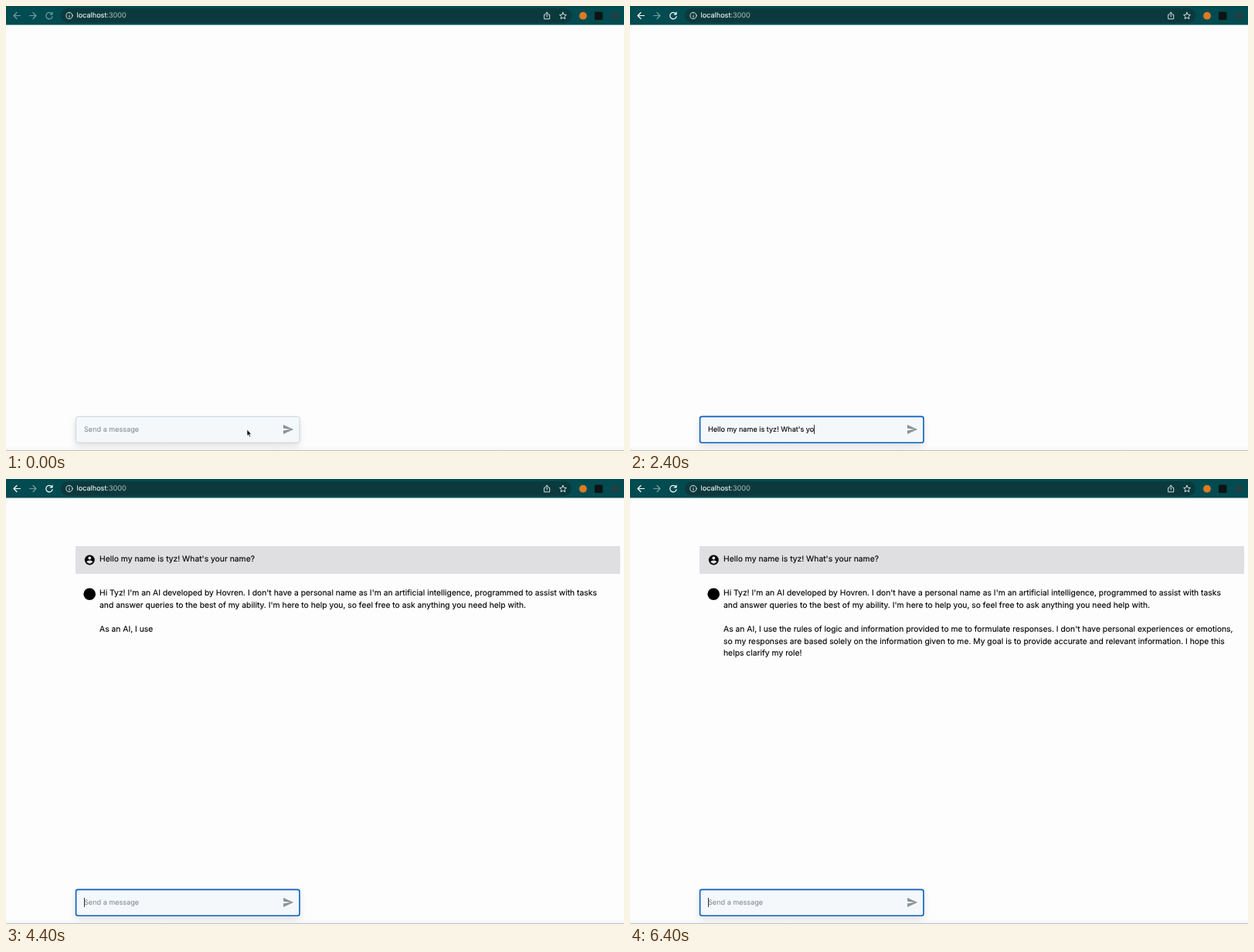
Recreate the animation shown at these times as an HTML page. Size 800 by 577 pixels, loop 6500 ms.

```html
<!DOCTYPE html>
<html lang="en">
<head>
<meta charset="utf-8">
<title>Chat</title>
<style>
  html, body { margin: 0; width: 100%; height: 100%; overflow: hidden; }
  body {
    position: relative;
    background: #fdfdfe;
    font-family: Inter, "Liberation Sans", sans-serif;
    text-rendering: geometricPrecision;
    color: #000;
  }
  .abs, .text { position: absolute; }
  .text { white-space: pre; -webkit-text-stroke: .12px currentColor; }
  .bottom {
    left: 0; top: 570px; width: 800px; height: 6px;
    background: linear-gradient(#f4f4f500, #f4f4f5);
    border-bottom: 1px solid #c2c2c4;
  }
  .bar { left: 90px; top: 87px; width: 705px; height: 36px; background: #dfdee0; }
  .chat { left: 121px; font-size: 10.345px; line-height: 15.6px; }
  .small { font-size: 9.1px; line-height: 14px; }
  .url { left: 91.5px; top: 5.5px; color: #9fb6b8; }
  .url b { font-weight: 400; color: #f2f7f7; }
  .shade {
    left: 90px; top: 532px; width: 290px; height: 34px; border-radius: 3px;
    box-shadow: 0 4px 8px rgba(0, 0, 0, .13);
  }
  .field { fill: #f5f8fa; stroke: #cbd6dc; stroke-width: 1; }
  .focus .field { stroke: #0b5fc0; stroke-width: 1.6; }
  .entry { left: 101px; top: 542.7px; }
  .hint { color: #8a9298; }
  #caret {
    display: inline-block; width: 1px; height: 12px;
    margin-right: -1px; vertical-align: middle; background: #333;
  }
  svg { position: absolute; left: 0; top: 0; }
  .line { fill: none; stroke-width: 1.2; stroke-linecap: round; stroke-linejoin: round; }
  .nav { stroke: #6f9fa2; }
  .focus .live { stroke: #fff; }
  .tool { stroke: #d3e0e1; stroke-width: 1; }
</style>
</head>
<body>
<div class="abs bottom"></div>
<div id="question">
  <div class="abs bar"></div>
  <div class="text chat" id="sent" style="top:97.2px"></div>
</div>
<div class="text chat" id="answer" style="top:141.2px"></div>
<div class="abs shade"></div>

<svg width="800" height="577" viewBox="0 0 800 577">
  <rect width="800" height="24.5" fill="#024b50"/>
  <rect x="71" y="3" width="661" height="19" rx="9.5" fill="#0c393d"/>
  <g class="line">
    <path class="nav live" d="M18.5 12.5H10M14 8.5l-4 4 4 4"/>
    <path class="nav" d="M30.5 12.5H39M35 8.5l4 4-4 4"/>
    <path class="nav live" d="M59.3 10A4.2 4.2 0 1 0 60.1 13.6M60 8v2.8H57.2"/>
    <g class="tool">
      <circle cx="82" cy="12.5" r="4.1"/>
      <path d="M82 12.3v2.3M82 10.3v.1"/>
      <path d="M698.2 11.2h-1.5v5.6h7v-5.6h-1.5M700.2 14V8.2M698.3 10l1.9-1.9 1.9 1.9"/>
      <path d="M721 8.3l1.3 2.9 3.1.3-2.3 2.1.7 3.1-2.8-1.6-2.8 1.6.7-3.1-2.3-2.1 3.1-.3z"/>
    </g>
  </g>
  <circle cx="747" cy="12.7" r="4.9" fill="#dc7a27"/>
  <rect x="762" y="7.5" width="10.5" height="10.5" rx="1.5" fill="#101214"/>
  <rect x="784" y="9" width="8.5" height="7.5" fill="#273d42"/>

  <g id="person">
    <circle cx="108.3" cy="105" r="6.5"/>
    <g fill="#dfdee0">
      <circle cx="108.3" cy="102.4" r="2"/>
      <path d="M104.4 107.6c0-1.3 2.6-2 3.9-2s3.9.7 3.9 2a4.7 4.7 0 0 1-7.8 0z"/>
    </g>
  </g>
  <circle id="bot" cx="108.2" cy="149.2" r="7.8"/>
  <rect class="field" x="90.6" y="532.4" width="289.4" height="33.8" rx="2.5"/>
  <path fill="#8a9299" d="M359 555l13.2-6-13.2-6v4.6l9.4 1.4-9.4 1.4z"/>
  <path id="pointer" fill="#000" stroke="#fff" stroke-width=".7"
    d="M312 549.3v8.1l1.8-1.7 1.3 3 1.4-.6-1.3-2.9h2.5z"/>
</svg>

<div class="text small url"><b>localhost</b>:3000</div>
<div class="text small entry hint" id="hint">Send a message</div>
<div class="text small entry"><span id="typed"></span><i id="caret"></i></div>

<script>
  const $ = id => document.getElementById(id);
  const message = "Hello my name is tyz! What's your name?";
  const reply = [
    "Hi Tyz! I'm an AI developed by Hovren. I don't have a personal name as I'm an artificial intelligence, programmed to assist with tasks",
    "and answer queries to the best of my ability. I'm here to help you, so feel free to ask anything you need help with.",
    "",
    "As an AI, I use the rules of logic and information provided to me to formulate responses. I don't have personal experiences or emotions,",
    "so my responses are based solely on the information given to me. My goal is to provide accurate and relevant information. I hope this",
    "helps clarify my role!"
  ].join("\n");
  const words = reply.match(/\S+\s*/g);

  const LOOP = 6500, STEP = 100, FOCUS = 100, SEND = 2700, BLINK = 1000 / 3;
  // [time, count] points, joined by straight lines
  const typing = [[100, 0], [200, 1], [300, 1], [1500, 17], [1600, 17], [2300, 28], [2600, 39]];
  const streaming = [[2800, 0], [3600, 26], [4400, 53], [5400, 90], [5700, words.length]];

  function countAt(points, t) {
    if (t <= points[0][0]) return points[0][1];
    for (let i = 1; i < points.length; i++) {
      const [t0, a] = points[i - 1], [t1, b] = points[i];
      if (t <= t1) return Math.floor(a + (b - a) * (t - t0) / (t1 - t0) + 1e-6);
    }
    return points[points.length - 1][1];
  }

  const show = (id, on) => { $(id).style.visibility = on ? "visible" : "hidden"; };

  function draw(t) {
    const sent = t >= SEND;
    const typed = sent ? "" : message.slice(0, countAt(typing, t));
    const count = countAt(streaming, t);

    document.body.classList.toggle("focus", t >= FOCUS);
    $("typed").textContent = typed;
    $("answer").textContent = words.slice(0, count).join("");
    show("hint", !typed);
    show("pointer", t < 200);
    show("question", sent);
    show("person", sent);
    show("bot", count > 0);
    show("caret", sent ? (t - SEND + 36) % BLINK < BLINK / 2 : t >= FOCUS);
  }

  $("sent").textContent = message;
  let last = -1;
  function tick() {
    const t = Math.floor(performance.now() % LOOP / STEP) * STEP;
    if (t !== last) draw(last = t);
    requestAnimationFrame(tick);
  }
  tick();
</script>
</body>
</html>
```
